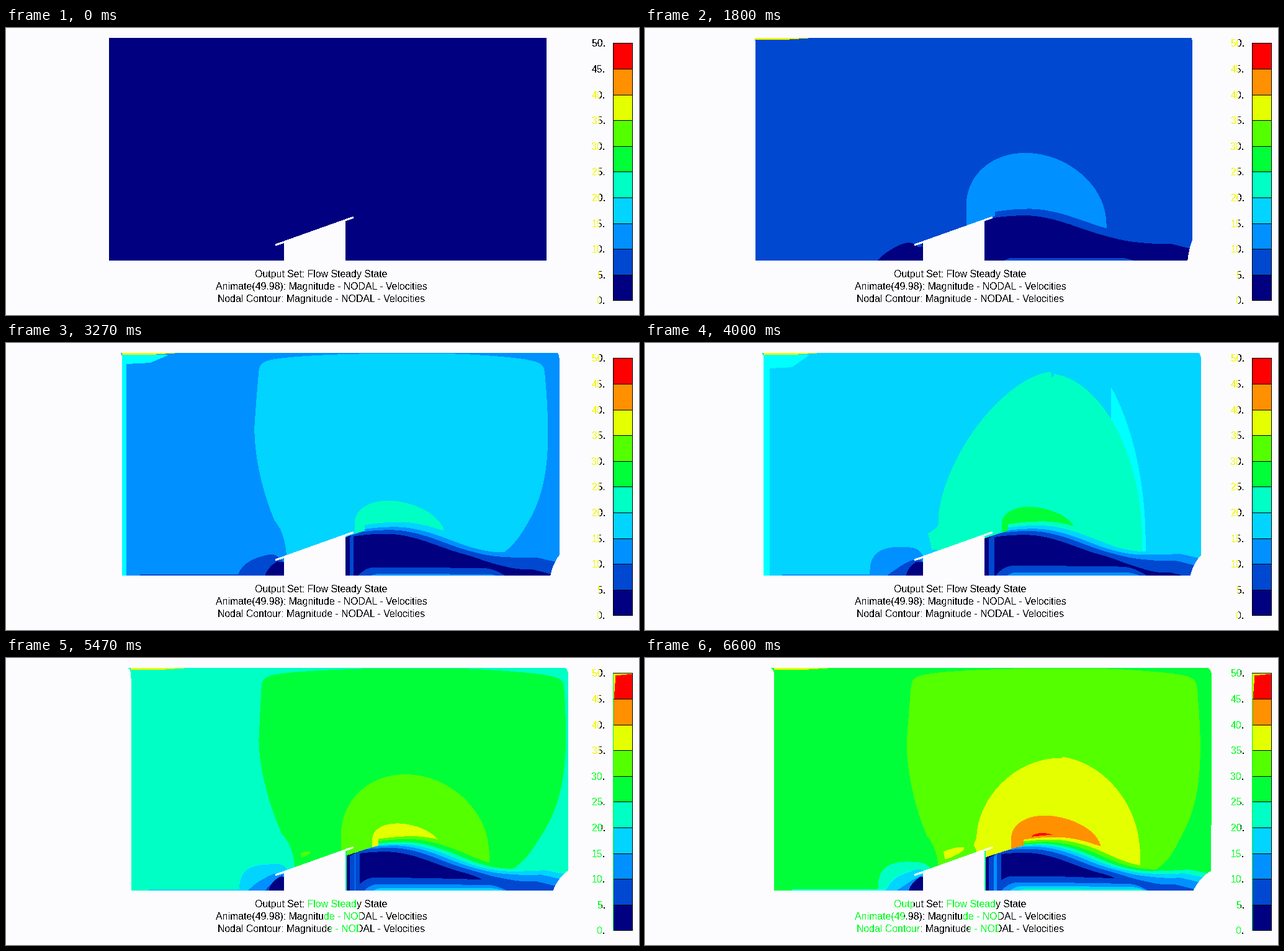
Recreate the animation shown at these times as a matplotlib script. Size 1020x464 px, loop 6670 ms.

```python
import numpy as np
import matplotlib.pyplot as plt
from matplotlib.animation import FuncAnimation
from matplotlib.patches import Polygon
from matplotlib.transforms import Bbox

plt.rcParams["font.family"] = "Liberation Sans"
plt.rcParams["text.antialiased"] = False

WIDTH, HEIGHT, DPI = 1020, 464, 80
STEPS, LOOP_MS = 100, 6670
LEFT, RIGHT, TOP, BOTTOM = 166, 871, 16, 376
FRONT, WALL = 448, 547  # sides of the building
DRIFT = 1.43  # pixels of mesh displacement per unit of velocity
PAPER = np.array([252, 252, 254], np.uint8)
PALETTE = np.array([
    (0, 0, 128), (0, 72, 208), (0, 144, 255), (0, 212, 255), (0, 255, 196),
    (0, 255, 56), (84, 255, 0), (228, 255, 0), (255, 144, 0), (255, 0, 0)],
    np.uint8)
CYAN, YELLOW, GREEN = "#00ffff", "#f0f800", "#00ff20"

cols, rows = np.arange(LEFT, RIGHT), np.arange(TOP, BOTTOM)
gx, gy = np.meshgrid(cols.astype(float), rows.astype(float))


def ease(x, start, end):
    t = np.clip((x - start) / (end - start), 0, 1)
    return t * t * (3 - 2 * t)


def gauss(x, centre, spread):
    return np.exp(-((x - centre) / spread) ** 2)


def arch(centre, base, left, right, height, p_left, p_right):
    """Half a superellipse on a base line: below 1 inside, above 1 outside."""
    dx = gx - centre
    power = np.where(dx < 0, p_left, p_right)
    across = np.abs(dx) / np.where(dx < 0, left, right)
    return across**power + (np.maximum(base - gy, 0) / height) ** power


def nested(levels, shapes, core):
    """Blend from level to level between shapes that enclose each other."""
    shapes = np.minimum.accumulate(shapes)
    field = core + (levels[0] - core) * np.minimum(shapes[0], 1)
    for v0, v1, f0, f1 in zip(levels, levels[1:], shapes, shapes[1:]):
        out, left = np.maximum(f0 - 1, 0), np.maximum(1 - f1, 0)
        field += (v1 - v0) * out / (out + left + 1e-9)
    return field


def dome_shape(level):
    rise = level - 33
    centre = 630 - 4 * rise
    left_edge = 427 + 125 * (1 - np.exp(-rise / 4))
    right_edge = 780 - 13.5 * rise
    height = 345 * np.exp(-0.46 * rise**0.74)
    return arch(centre, 300 + 0.13 * (gx - 605), centre - left_edge,
                right_edge - centre, height, 1.5 if level < 36 else 2, 2)


def dome_field():
    """Fast air over the roof, fading towards the inlet and the outlet."""
    levels = [45, 42, 40, 38, 36, 35, 34, 33]
    left = 359 + 58 * np.clip((gy - 130) / 175, 0, 1) ** 1.6
    right = 900 - 115 * (gy / 331) ** 4
    reach = np.where(gx < 630, 630 - left, right - 630)
    outer = np.abs(gx - 630) / reach
    shapes = [dome_shape(v) for v in levels] + [outer]
    field = nested(levels + [30], shapes, 46)
    return field - 0.4 * np.clip(10 * (outer - 1), 0, 1)


def mound_field():
    """Slow air piled up in front of the building."""
    keys = [  # level, centre, left reach, height, power
        (5, 440, 23, 24, 2), (13.4, 430, 40, 27, 1), (24.75, 400, 55, 45, 3),
        (26.7, 345, 82, 63, 3), (27.5, 345, 111, 78, 3),
        (29.5, 338, 150, 110, 3)]
    peak = 1 + 1.2 * gauss(gx, 261, 30)
    shapes = [arch(c, BOTTOM, w, max(430 - c, 12),
                   h * (peak if v > 27 else 1), p, p)
              for v, c, w, h, p in keys]
    field = nested([key[0] for key in keys], shapes, 0)
    return field + 30 * np.maximum(np.min(shapes, axis=0) - 1, 0)


def wake_field(outer):
    """Shear layer behind the roof with recirculating air below it."""
    shear = (299 + 37 * ease(gx, 605, 780)
             + 5 * np.clip((605 - gx) / 58, 0, 1) ** 2
             + 8 * np.clip((gx - 840) / 30, 0, 1))
    depth = gy - shear
    length = 9 + 20 * ease(gx, 730, 830)
    layer = 27.5 * np.exp(-np.maximum(depth, 0) / length)
    lobe = (25 * np.exp((gy - BOTTOM) / 15) * ease(gx, 540, 585)
            * (1 - 0.7 * ease(gx, 760, 810)))
    wall = 13 * np.exp(-np.maximum(gx - WALL, 0) / 20) * (gy > 312)
    inside = np.maximum(np.maximum(layer, lobe), wall)
    return np.where(depth < 0, np.minimum(outer, 27.5 - 1.3 * depth), inside)


def velocity_field():
    above = 351 - (gx - 434) * 45 / 126 - gy  # height over the plate
    field = dome_field() - 3.5 * np.exp((TOP - gy) / 4)
    field += 3.5 * gauss(gx, 430, 30) * gauss(above, 33, 10)
    field = np.minimum(field, mound_field())
    over = (gx >= 434) & (above >= 0)
    field = np.where(over, np.minimum(field, 5.5 * above), field)
    field[(gx >= FRONT) & (above < 0)] = 0
    field = np.where(gx >= WALL, wake_field(dome_field()
                     - 3.5 * np.exp((TOP - gy) / 4)), field)
    field[-2:, 30:250] = np.minimum(field[-2:, 30:250], 20)
    return np.clip(field, 0, 49)


speed = velocity_field()
sink = 10 * gauss(gx, 765, 80) * gauss(gy, 325, 30)
row_index = np.arange(len(rows))[:, None]
col_index = np.arange(len(cols))[None]
screen_x = np.arange(160, 930)


def base_picture():
    """Empty stage with the colour legend."""
    picture = np.empty((HEIGHT, WIDTH, 3), np.uint8)
    picture[:] = PAPER
    lines = np.round(440.5 - 41.6 * np.arange(11)).astype(int)
    for color, low, high in zip(PALETTE, lines, lines[1:]):
        picture[high:low, 978:1010] = color
    picture[lines, 978:1010] = 0
    picture[lines[-1]:lines[0], [978, 1009]] = 0
    return picture


stage = base_picture()


def flow_picture(scale):
    source = np.clip(row_index - scale * sink, 0, len(rows) - 1.001)
    low = source.astype(int)
    part = source - low
    moved = (speed[low, col_index] * (1 - part)
             + speed[low + 1, col_index] * part)
    x = np.maximum.accumulate(cols + scale * DRIFT * moved, axis=1)
    x += 1e-4 * col_index
    shown = np.array([np.interp(screen_x, xr, vr, left=np.nan, right=np.nan)
                      for xr, vr in zip(x, moved * scale)])
    empty = np.isnan(shown)
    shown[empty] = 0
    rgb = PALETTE[np.searchsorted(np.arange(5, 50, 5), shown, side="right")]
    sides = (screen_x < 430) | (screen_x > 750)
    rgb[(shown > 19.75) & (shown < 20) & sides] = (0, 255, 255)
    rgb[empty] = PAPER
    picture = stage.copy()
    picture[TOP:BOTTOM, screen_x[0]:screen_x[-1] + 1] = rgb
    return picture


fig = plt.figure(figsize=(WIDTH / DPI, HEIGHT / DPI), dpi=DPI,
                 facecolor=PAPER / 255)
ax = fig.add_axes([0, 0, 1, 1])
ax.axis("off")
image = ax.imshow(flow_picture(0), extent=(0, WIDTH, HEIGHT, 0),
                  interpolation="nearest", aspect="auto")
ax.set(xlim=(0, WIDTH), ylim=(HEIGHT, 0))

timed = []  # (artist, first scale, last scale)


def shape(points, color, start=0.0, end=2.0, z=3):
    patch = ax.add_patch(Polygon(points, closed=True, fc=color, ec="none",
                                 lw=0, antialiased=False, zorder=z))
    timed.append((patch, start, end))
    return patch


def box(x0, y0, x1, y1):
    return [(x0, y0), (x1, y0), (x1, y1), (x0, y1)]


def label(x, y, text, align, tints=()):
    """Black text, parts of which take another colour later."""
    style = dict(ha=align, va="baseline", fontsize=15.9 * 72 / DPI)
    ax.text(x, y, text, color="black", zorder=6, **style)
    for x0, x1, color, start in tints:
        copy = ax.text(x, y, text, color=color, zorder=7, **style)
        copy.set_clip_on(True)
        copy.set_clip_box(Bbox([[x0, 0], [x1, HEIGHT]]))
        timed.append((copy, start, 2.0))


# Building with its overhanging plate
shape([(FRONT, 347), (WALL, 311), (WALL, BOTTOM), (FRONT, BOTTOM)],
      PAPER / 255, z=4)
shape([(434, 350), (560, 305), (560, 307), (434, 352)], "white", z=5)
shape(box(WALL, 311, WALL + 2, BOTTOM), "#00ff90", 0.7)

# Bright rims of the moving mesh
inlet = shape(box(0, 0, 1, 1), CYAN, 0.3, 0.665)
corner = shape(box(0, 0, 1, 1), YELLOW, 0.12)

# Legend highlights and numbers
shape([(979, 25), (1009, 25), (982, 28), (979, 66)], YELLOW, 0.7)
shape(box(978, 25, 979, 441), GREEN, 0.7, z=4)
for value in range(0, 55, 5):
    label(966, 446.5 - 8.32 * value, f"{value}.", "right", [
        (940, 956, YELLOW, 0 if value <= 40 else 0.1),
        (940, 960, GREEN, 0.7 if value <= 30 else 0.88)])

label(508, 403, "Output Set: Flow Steady State", "center",
      [(487, 566, GREEN, 0.7), (400, 433, GREEN, 0.85)])
label(508, 423, "Animate(49.98): Magnitude - NODAL - Velocities", "center",
      [(513, 570, GREEN, 0.7), (338, 418, GREEN, 0.85)])
label(508, 443, "Nodal Contour: Magnitude - NODAL - Velocities", "center",
      [(523, 570, GREEN, 0.7), (340, 443, GREEN, 0.85)])


def draw(step):
    scale = step / (STEPS - 1)
    image.set_data(flow_picture(scale))
    x = LEFT + 42.5 * scale
    w, h = 3 + 26 * max(scale - 0.374, 0), 70 * max(scale - 0.33, 0)
    inlet.set_xy([(x, 18), (x + 72, 20), (x + 45, 20 + h), (x + w, 22 + h),
                  (x + w, BOTTOM), (x, BOTTOM)])
    corner.set_xy([(x, 16), (x + 85, 16), (x + 40, 19), (x, 19)])
    for artist, start, end in timed:
        artist.set_visible(start <= scale < end)
    return []


anim = FuncAnimation(fig, draw, frames=STEPS, interval=LOOP_MS / STEPS,
                     repeat=True, repeat_delay=0, blit=False)
plt.show()
```
